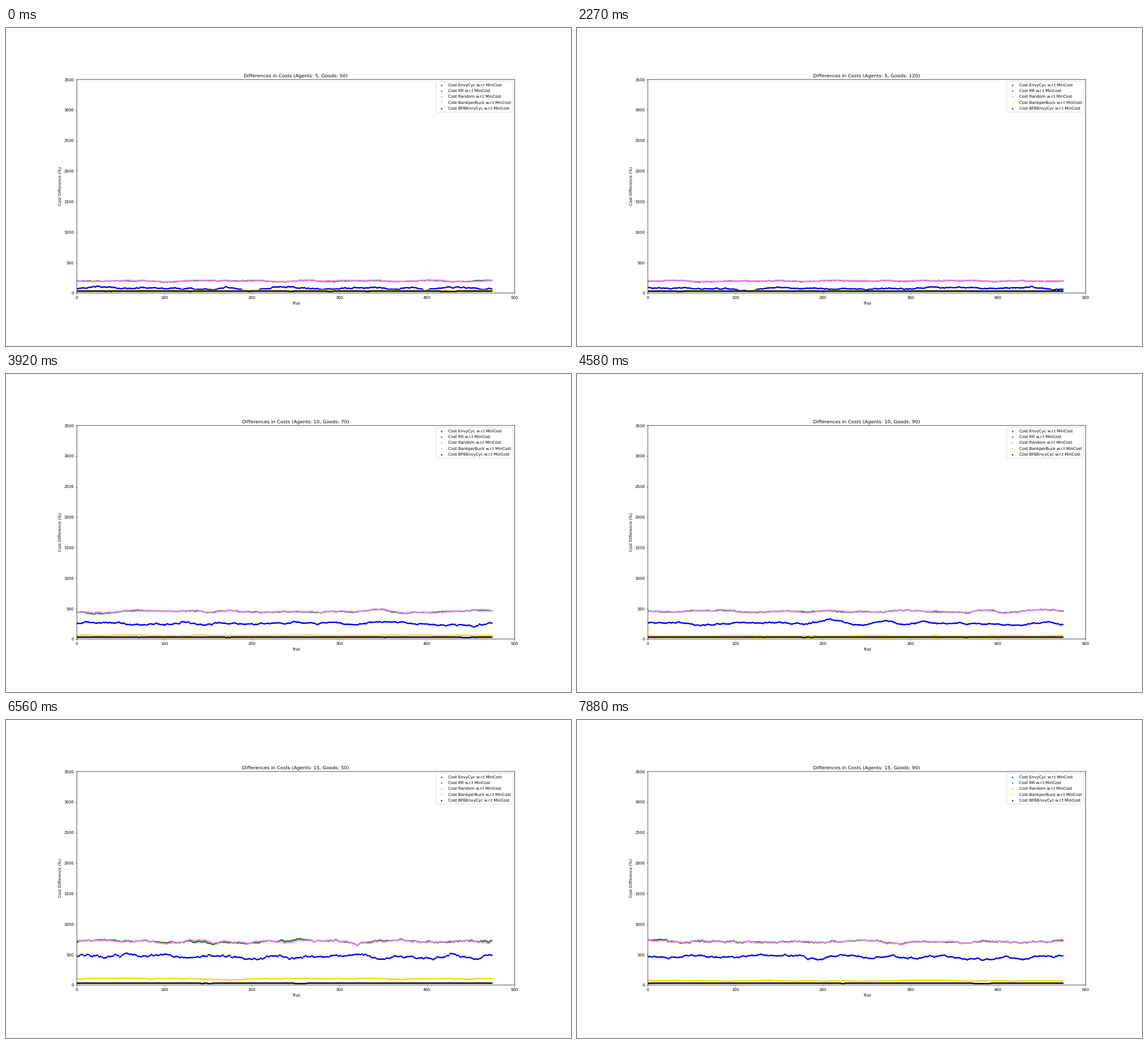
These frames come from a looping animation (998 px wide and 561 px high, 8000 ms). A matplotlib script:

```python
import numpy as np
import matplotlib.pyplot as plt
from matplotlib.animation import FuncAnimation

W, H, DPI = 998, 561, 50
LOOP, STEP = 8000, 20          # ms
HOLD, LEAD = 330, 40           # ms per chart, time already spent on the first
CHARTS = 25
TRIALS, WINDOW = 475, 26
LEFT, RIGHT, TOP, BOTTOM = 125.1, 898.5, 90.9, 467.7   # plot box in pixels
DOT = 3.74                     # dot diameter in points
GRID = 6.4                     # cost values fall on a fine vertical raster

SERIES = [("EnvyCyc", "blue"), ("RR", "green"), ("Random", "violet"),
          ("BankperBuck", "gold"), ("BFBEnvyCyc", "black")]

# Each dot is a tiny dash with round caps; gaps in y separate them
X = (np.arange(TRIALS)[:, None] + [-0.02, 0.02, 0.02]).ravel()


def dashes(values):
    y = np.repeat(np.round(values / GRID) * GRID, 3)
    y[2::3] = np.nan
    return y


def rolling(rng, sd):
    """Moving average of white noise, with standard deviation sd."""
    noise = rng.normal(0, sd * np.sqrt(WINDOW), TRIALS + WINDOW - 1)
    return np.convolve(noise, np.ones(WINDOW) / WINDOW, "valid")


def chart(k):
    agents, goods = 5 * (1 + k // 10), 50 + 10 * (k % 10)
    rng = np.random.default_rng(400 + k)
    calm = (50 / goods) ** 0.3
    envy = 0.68 * agents ** 2 + 25.4 * agents - 64
    upper = 50.5 * agents - 52 + rolling(rng, 1.4 * agents * calm)
    buck = 30 + 300 * (agents - 3) / goods
    drift = 0.5 * agents * calm
    rows = [envy + rolling(rng, (13 + agents) * calm),
            upper + rolling(rng, drift),
            upper + rolling(rng, drift),
            buck + rolling(rng, 0.05 * buck * calm),
            31 + rolling(rng, 1.5 * calm)]
    title = f"Differences in Costs (Agents: {agents}, Goods: {goods})"
    return title, [dashes(row) for row in rows]


charts = [chart(k) for k in range(CHARTS)]

plt.rcParams.update({"font.family": "DejaVu Sans", "font.size": 10,
                     "text.hinting": "none", "axes.linewidth": 1.0,
                     "path.simplify": False})
fig = plt.figure(figsize=(W / DPI, H / DPI), dpi=DPI, facecolor="white")
ax = fig.add_axes([LEFT / W, 1 - BOTTOM / H, (RIGHT - LEFT) / W, (BOTTOM - TOP) / H])
ax.set(xlim=(0, 500), ylim=(0, 3500), xlabel="Trial", ylabel="Cost Difference (%)")
for spine in ax.spines.values():
    spine.set_snap(False)
title = ax.set_title("", fontsize=12.2, pad=7)

lines = []
for name, color in SERIES:
    lines += ax.plot(X, np.zeros_like(X), color=color, lw=DOT,
                     solid_capstyle="round", snap=False)
    ax.scatter([], [], s=5, color=color, label=f"Cost {name} w.r.t MinCost")
ax.legend(loc="upper right")


def update(i):
    k = min((i * STEP + STEP // 2 + LEAD) // HOLD, CHARTS - 1)
    text, rows = charts[k]
    title.set_text(text)
    for line, y in zip(lines, rows):
        line.set_ydata(y)
    return [title, *lines]


anim = FuncAnimation(fig, update, frames=LOOP // STEP, interval=STEP,
                     repeat=True, repeat_delay=0, blit=False)
plt.show()
```
